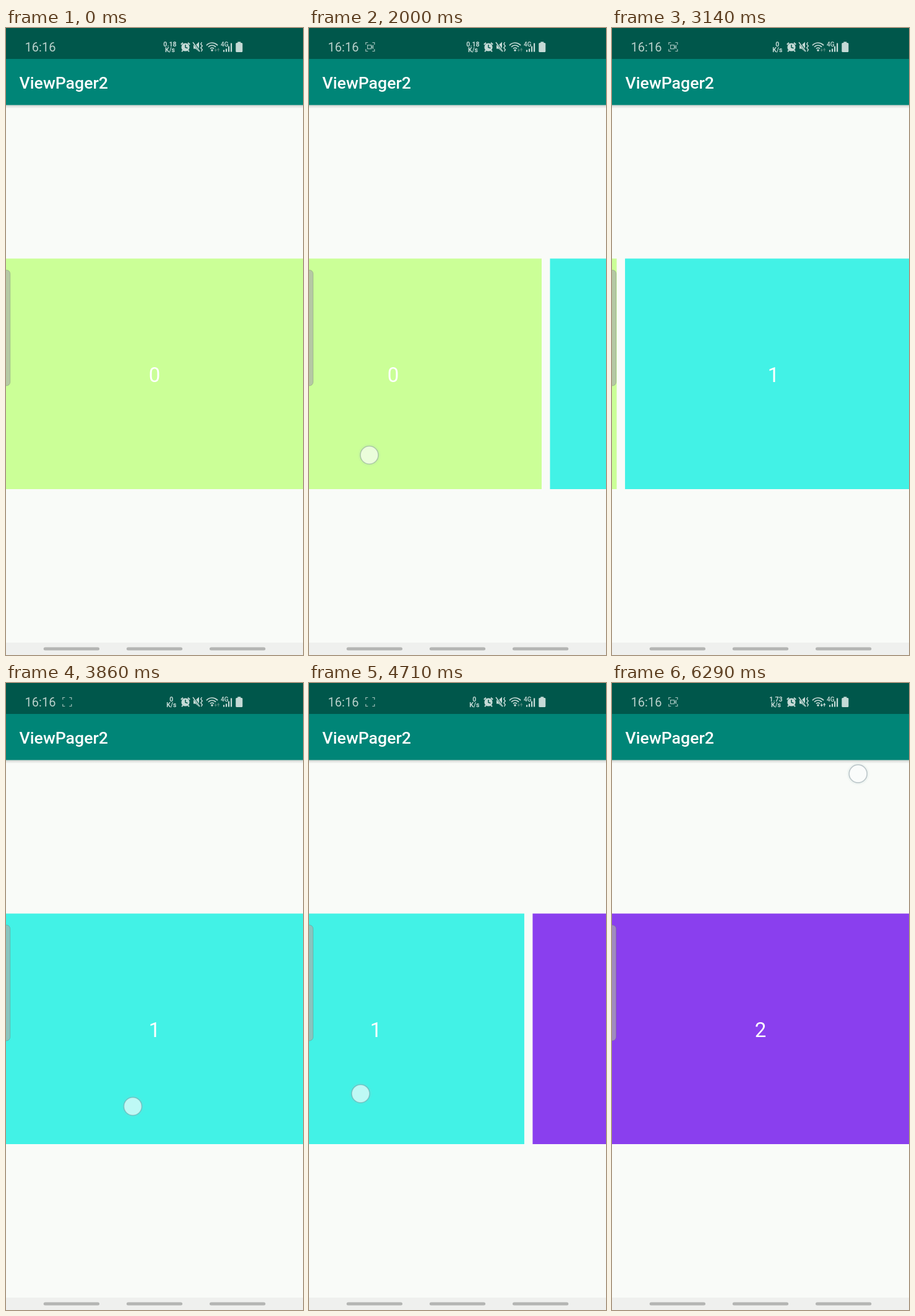
An HTML page with a canvas that plays this animation: 480 px wide and 1013 px high, repeating every 6440 ms.

```html
<!DOCTYPE html>
<html lang="en">
<head>
<meta charset="utf-8">
<title>Pager swipe</title>
<style>
html, body { margin: 0; width: 100%; height: 100%; overflow: hidden; background: #f9fbf8; }
canvas { display: block; width: 480px; height: 1013px; }
</style>
</head>
<body>
<canvas id="stage" width="480" height="1013"></canvas>
<script>
const ctx = document.getElementById('stage').getContext('2d');
const LOOP = 6440, FPS = 7, LAST_STEP = 44;
const STRIDE = 493.5, SETTLE = 465;
const PAGE_COLORS = ['#cbff97', '#42f2e6', '#8a3fee'];
const ICON = '#c5dad6', BAR = '#00574b';

// Each key: time, finger x, finger y, dragged distance.
const swipes = [
  { release: 2925, end: 3468, keys: [
    [1428, 203, 703, 0], [1571, 180, 700, 22], [2000, 97.5, 690, 104],
    [2428, 40, 670, 172], [2925, 12, 640, 220]] },
  { release: 5208, end: 5751, keys: [
    [3857, 205, 684, 0], [4143, 156.5, 678, 50], [4714, 83.5, 663.5, 132],
    [5000, 26, 640, 200], [5208, 12.5, 627.5, 220]] }
];

function sample(keys, t) {
  if (t <= keys[0][0]) return keys[0];
  const n = keys.findIndex(key => key[0] >= t);
  if (n < 0) return keys[keys.length - 1];
  const a = keys[n - 1], b = keys[n], p = (t - a[0]) / (b[0] - a[0]);
  return a.map((v, i) => v + (b[i] - v) * p);
}

function swipeOffset({ keys, release, end }, t) {
  if (t <= release) return sample(keys, t)[3];
  return STRIDE - 126 * (Math.max(0, end - t) / SETTLE) ** 5;
}

function rect(x, y, w, h, color) {
  ctx.fillStyle = color;
  ctx.fillRect(x, y, w, h);
}

function rounded(x, y, w, h, radius, color) {
  ctx.beginPath();
  ctx.roundRect(x, y, w, h, radius);
  ctx.fillStyle = color;
  ctx.fill();
}

function disc(x, y, r, color) {
  ctx.beginPath();
  ctx.arc(x, y, r, 0, Math.PI * 2);
  ctx.fillStyle = color;
  ctx.fill();
}

function line(points, color, width) {
  ctx.beginPath();
  points.forEach(([x, y]) => ctx.lineTo(x, y));
  ctx.strokeStyle = color;
  ctx.lineWidth = width;
  ctx.stroke();
}

function polygon(points, color) {
  ctx.beginPath();
  points.forEach(([x, y]) => ctx.lineTo(x, y));
  ctx.fillStyle = color;
  ctx.fill();
}

function text(str, x, y, size, color, weight = 400, align = 'left') {
  ctx.font = `${weight} ${size}px Roboto, sans-serif`;
  ctx.textAlign = align;
  ctx.fillStyle = color;
  ctx.fillText(str, x, y);
}

function drawAlarm() {
  disc(290, 31, 6.6, ICON);
  line([[282.8, 26.8], [286, 23.8]], ICON, 2);
  line([[297.2, 26.8], [294, 23.8]], ICON, 2);
  line([[286, 36], [284, 38.2]], ICON, 2);
  line([[294, 36], [296, 38.2]], ICON, 2);
  line([[290, 27], [290, 31.5], [293.5, 32.5]], BAR, 1.5);
}

function drawMute() {
  polygon([[303, 27.5], [306.5, 27.5], [312, 22.5], [312, 38.5], [306.5, 33.5], [303, 33.5]], ICON);
  line([[302, 22.5], [313.5, 38]], BAR, 3);
  line([[302, 23], [313, 38]], ICON, 1.5);
  line([[316.5, 23], [314.8, 26], [317.2, 29], [314.8, 32], [317.2, 35], [315.5, 38]], ICON, 1.5);
}

function drawWifi(active) {
  for (const r of [4, 8, 12]) {
    ctx.beginPath();
    ctx.arc(333, 36, r, -Math.PI * 0.77, -Math.PI * 0.23);
    ctx.strokeStyle = ICON;
    ctx.lineWidth = 1.7;
    ctx.stroke();
  }
  disc(333, 36, 1.8, ICON);
  const color = active ? ICON : '#4c8379';
  polygon([[336.5, 35], [341, 35], [338.7, 38.5]], color);
  rect(338.1, 33, 1.2, 3, color);
  polygon([[341, 35.5], [345.5, 35.5], [343.2, 32]], color);
  rect(342.6, 35, 1.2, 3, color);
}

function drawSignal() {
  text('4G', 347, 30, 10, ICON, 500);
  [3, 5, 9, 14].forEach((h, i) => rect(351 + i * 4, 38.5 - h, 2.2, h, ICON));
}

function drawRecorder(alpha, camera) {
  ctx.globalAlpha = alpha;
  const color = '#9fc0ba';
  for (const sx of [-1, 1]) for (const sy of [-1, 1]) {
    const x = 98.8 + sx * 7, y = 30.5 + sy * 7;
    line([[x - sx * 3.5, y], [x, y], [x, y - sy * 3.5]], color, 1.2);
  }
  if (camera) {
    ctx.strokeStyle = color;
    ctx.lineWidth = 1.2;
    ctx.strokeRect(94.6, 27.6, 6, 6);
    line([[101, 30.6], [103.6, 28.2], [103.6, 33], [101, 30.6]], color, 1.1);
  }
  ctx.globalAlpha = 1;
}

function drawStatus(step) {
  rect(0, 0, 480, 50, BAR);
  text('16:16', 30.6, 38, 20, '#b9d0cb');
  if (step > 0) drawRecorder(Math.min(1, step * 0.45), step % FPS < 3);
  const speed = step < 15 ? '0.18' : step < 36 ? '0' : '1.73';
  const center = speed === '0' ? 267.3 : 265;
  text(speed, center, 29.8, 10.6, ICON, 700, 'center');
  text('K/s', center, 39, 10.6, ICON, 700, 'center');
  drawAlarm();
  drawMute();
  drawWifi(step >= 36);
  drawSignal();
  rounded(371.3, 24, 11, 15, 1.5, ICON);
  rect(374.3, 22.3, 5, 2.5, ICON);
}

function drawHeader(step) {
  drawStatus(step);
  rect(0, 50, 480, 74.5, '#008577');
  text('ViewPager2', 21.5, 97.5, 26.67, '#fff', 500);
  const shadow = ctx.createLinearGradient(0, 124.5, 0, 130);
  shadow.addColorStop(0, 'rgba(0,0,0,.16)');
  shadow.addColorStop(1, 'rgba(0,0,0,0)');
  rect(0, 124.5, 480, 5.5, shadow);
}

function drawPages(scroll) {
  PAGE_COLORS.forEach((color, i) => {
    const x = i * STRIDE - scroll;
    if (x >= 480 || x <= -480) return;
    rect(x, 372.5, 480, 372.5, color);
    text(String(i), x + 240, 572, 33, '#fff', 400, 'center');
  });
}

function drawHandle() {
  rounded(-8, 391, 14.7, 187, 6, 'rgba(171,174,172,.68)');
  ctx.strokeStyle = 'rgba(90,100,90,.3)';
  ctx.lineWidth = 1;
  ctx.stroke();
}

function drawTouch(x, y, fading) {
  disc(x, y, 18, 'rgba(170,190,195,.1)');
  disc(x, y, fading ? 13.5 : 14.5, `rgba(255,255,255,${fading ? 0.33 : 0.64})`);
  if (fading) return;
  ctx.strokeStyle = 'rgba(110,130,140,.4)';
  ctx.lineWidth = 1.7;
  ctx.stroke();
}

function drawNavigation() {
  rect(0, 993, 480, 20, '#eff0ee');
  for (const x of [60.7, 194.8, 329]) rounded(x, 1000.5, 90.3, 5, 2.5, '#b4b5b3');
}

function draw(time) {
  const step = Math.min(LAST_STEP, Math.floor((time + 5) * FPS / 1000));
  const t = step * 1000 / FPS;
  rect(0, 0, 480, 1013, '#f9fbf8');
  drawPages(swipes.reduce((sum, swipe) => sum + swipeOffset(swipe, t), 0));
  drawHeader(step);
  drawHandle();
  drawNavigation();
  for (const { keys, release } of swipes) {
    if (t < keys[0][0] || t > release + 100) continue;
    const [, x, y] = sample(keys, t);
    drawTouch(x, y, t > release);
  }
  if (step === LAST_STEP) drawTouch(397.7, 146.7, false);
}

function tick() {
  draw(performance.now() % LOOP);
  requestAnimationFrame(tick);
}
tick();
</script>
</body>
</html>
```
